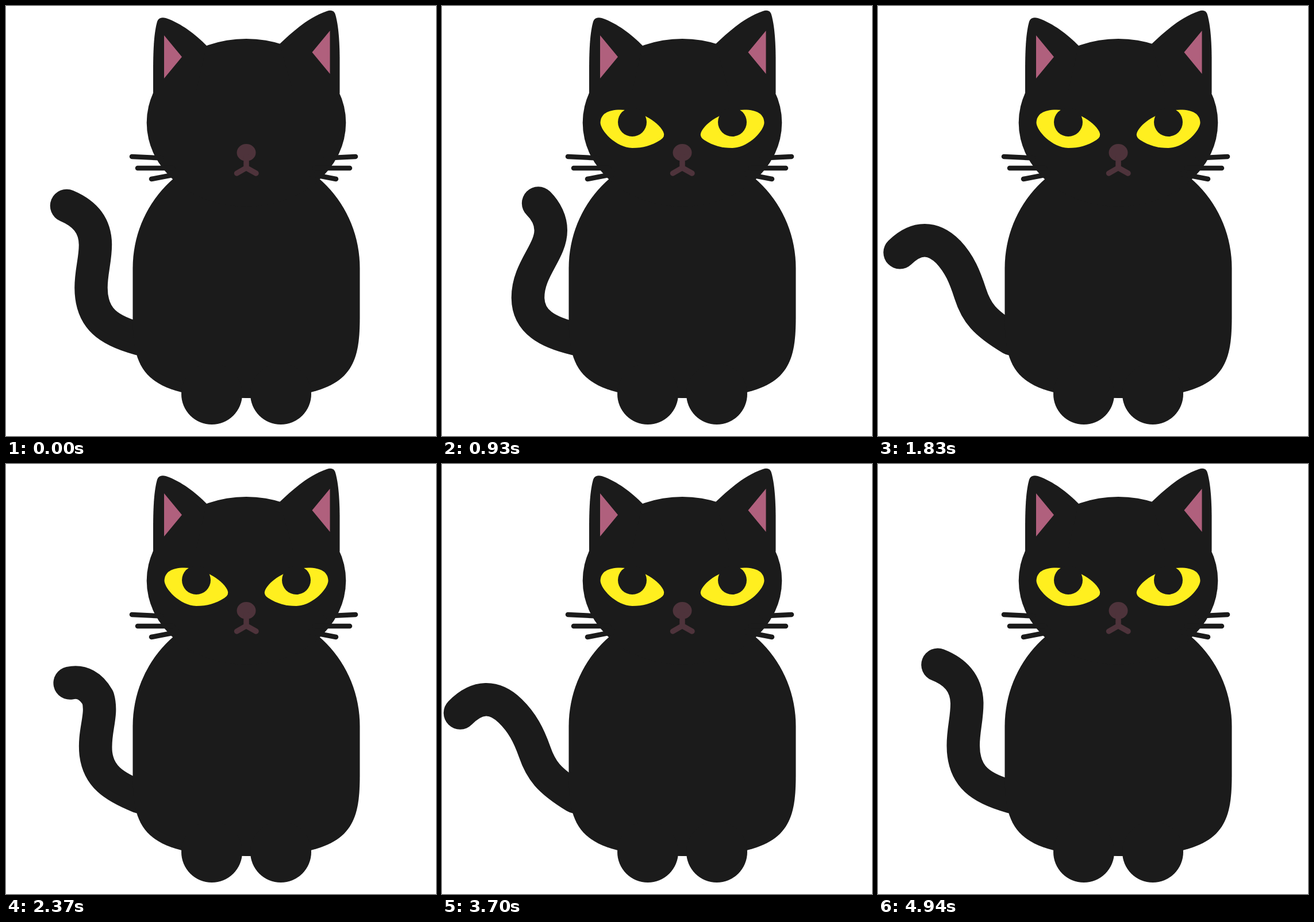
Animation, 748 px wide and 748 px high, one loop 4980 ms. Source, as an HTML page:

```html
<!DOCTYPE html>
<html lang="en">
<head>
<meta charset="utf-8">
<title>Black cat</title>
<style>
  html, body { margin: 0; width: 100%; height: 100%; overflow: hidden; background: #fff; }
  svg { display: block; width: 100vw; height: 100vh; }
  .line { fill: none; stroke-linecap: round; stroke-linejoin: round; }
</style>
</head>
<body>
<svg viewBox="0 0 748 748" fill="#1b1b1b">
  <path id="tail" class="line" stroke="#1b1b1b" stroke-width="57.5"/>

  <!-- body and feet -->
  <path d="M220.5 456A197.5 203 0 0 1 615.5 456V540C615.5 635 598 682 418 682C238 682 220.5 635 220.5 540Z"/>
  <circle cx="358" cy="675" r="53"/>
  <circle cx="478" cy="675" r="53"/>

  <!-- head and ears -->
  <ellipse cx="418" cy="203" rx="173.3" ry="146"/>
  <path d="M256 152V112C256 70 258 45 263 27Q266 18 278 21C305 30 330 50 349 69L330 152Z"/>
  <path d="M580.5 152V95C580.5 60 578 32 573 15Q570 5 558 9C528 19 500 43 476 66L500 152Z"/>
  <path fill="#b0607d" d="M275 51L306 88.5L275 126ZM563.5 43L532.5 80.5L563.5 118Z"/>

  <path class="line" stroke="#1b1b1b" stroke-width="8.5"
    d="M219 262L270 264.5M229 282H290M253 301L300 292M608 262L557 264.5M598 282H537M574 301L527 292"/>

  <g id="eyes">
    <g id="eye">
      <path fill="#ffef1f" d="M275.5 203C276 188 288 180.5 310 180.5C340 180.5 375 199 385 219Q389 227 380 233C364 243 350 247 331 247C302 246 276 217 275.5 203Z"/>
      <circle cx="331" cy="202" r="25"/>
    </g>
    <use href="#eye" transform="matrix(-1 0 0 1 836 0)"/>
  </g>

  <!-- nose and mouth -->
  <g fill="#4e333b" stroke="#4e333b">
    <ellipse cx="418" cy="255" rx="16.5" ry="15" stroke="none"/>
    <path class="line" stroke-width="9.5" d="M418 262V281M401.5 291L418 281.5L435 291"/>
  </g>
</svg>
<script>
const LOOP = 4980, BLINK = 250, EYE_Y = 214;
const tail = document.getElementById('tail');
const eyes = document.getElementById('eyes');

// Tail poses: start point, then three cubic segments, tip to root.
const rest = [105.5,347.5, 135,360, 155,380, 155.5,415, 155.5,442, 148,462, 148,490, 148,545, 180,565, 232,579];
const right = [168,343, 182,357, 189.5,374, 189.5,390, 189.5,428, 149.5,458, 149.5,507, 149.5,550, 185,568, 232,579];
const tucked = [168,344, 182,358, 189.5,375, 189.5,391, 189.5,429, 153,460, 153,506, 153,550, 187,568, 232,579];
const left = [30,434, 60,403, 90,403, 118,430, 139,450, 151,472, 161,500, 172,532, 185,550, 232,579];

const linear = u => u;
const smooth = u => (1 - Math.cos(Math.PI * u)) / 2;
const settle = u => u + 0.2 * u * u * Math.sin(Math.PI * u);

// Each key: time in ms, pose, easing towards the next key.
const keys = [
  [0, rest, smooth],
  [980, right, linear],
  [1770, left, linear],
  [2790, tucked, linear],
  [3710, left, settle],
  [5000, rest]
];

function tailPath(t) {
  const i = keys.findLastIndex(k => k[0] <= t);
  const [start, from, ease] = keys[i];
  const [end, to] = keys[i + 1];
  const s = ease((t - start) / (end - start));
  const p = from.map((v, j) => v + (to[j] - v) * s);
  return `M${p.slice(0, 2)}C${p.slice(2)}`;
}

function draw(now) {
  const t = now % LOOP;
  const open = smooth(Math.min(t / BLINK, 1));
  tail.setAttribute('d', tailPath(t));
  eyes.setAttribute('transform', `matrix(1 0 0 ${open} 0 ${EYE_Y * (1 - open)})`);
}

let begin;
function tick(now) {
  begin ??= now;
  draw(Math.max(0, now - begin));
  requestAnimationFrame(tick);
}
draw(0);
requestAnimationFrame(tick);
</script>
</body>
</html>
```
